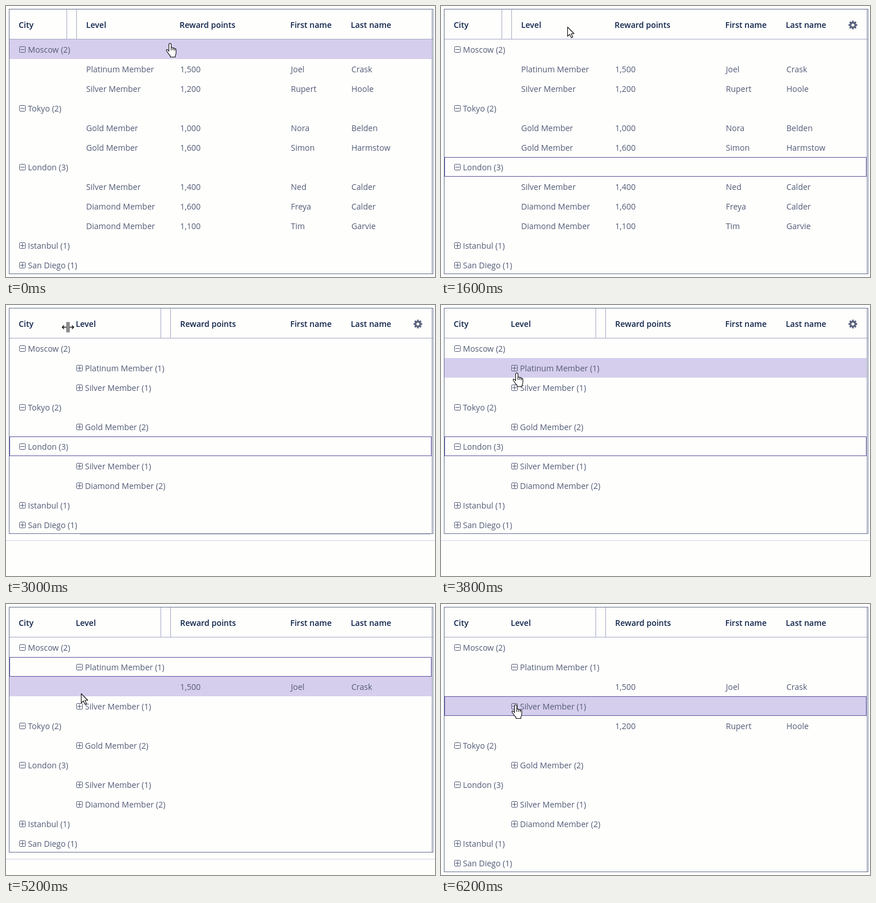
Write an HTML page with a canvas that moves like this. It is 744 px wide and 470 px high and loops after 7.2 s.

```html
<!DOCTYPE html>
<html lang="en">
<head>
<meta charset="utf-8">
<title>Grouped grid</title>
<style>
html, body { margin: 0; width: 100%; height: 100%; overflow: hidden; background: #fefefd; }
canvas { display: block; }
</style>
</head>
<body>
<canvas id="stage" width="744" height="470"></canvas>
<script>
const ctx = document.getElementById('stage').getContext('2d');
const LOOP = 7200, STEP = 200, HEAD = 58, ROW = 34;
const INK = '#535c76', DARK = '#10234a', RULE = '#a4abc3', EDGE = '#68718f';
const HOVER = '#d6ceed', FOCUS = '#5f55a0', PAPER = '#fefefd';
const FONT = '"Open Sans", "Noto Sans", sans-serif';

const people = [
  ['Platinum Member', '1,500', 'Joel', 'Crask'],
  ['Silver Member', '1,200', 'Rupert', 'Hoole'],
  ['Gold Member', '1,000', 'Nora', 'Belden'],
  ['Gold Member', '1,600', 'Simon', 'Harmstow'],
  ['Silver Member', '1,400', 'Ned', 'Calder'],
  ['Diamond Member', '1,600', 'Freya', 'Calder'],
  ['Diamond Member', '1,100', 'Tim', 'Garvie']
];
const cities = [
  ['Moscow', people.slice(0, 2)],
  ['Tokyo', people.slice(2, 4)],
  ['London', people.slice(4)]
];

const group = (x, label, count, open) => ({ x, open, label: `${label} (${count})` });

// Rows for the grid; openTiers tells how many tier groups are expanded.
function buildRows(byTier, openTiers) {
  const rows = [];
  for (const [city, members] of cities) {
    rows.push(group(23, city, members.length, true));
    if (!byTier) {
      members.forEach(m => rows.push({ cells: m }));
      continue;
    }
    for (const tier of new Set(members.map(m => m[0]))) {
      const inTier = members.filter(m => m[0] === tier);
      const open = openTiers-- > 0;
      rows.push(group(122, tier, inTier.length, open));
      if (open) inTier.forEach(m => rows.push({ cells: ['', ...m.slice(1)] }));
    }
  }
  rows.push(group(23, 'Istanbul', 1, false), group(23, 'San Diego', 1, false));
  return rows;
}

const flat = buildRows(false);
const states = [
  { from: 0, rows: flat, focus: -1 },
  { from: 600, rows: flat, focus: 6 },
  { from: 2400, rows: buildRows(true, 0), focus: 5, tiered: true },
  { from: 4400, rows: buildRows(true, 1), focus: 1, tiered: true },
  { from: 5600, rows: buildRows(true, 2), focus: 3, tiered: true }
];
const bottoms = [
  { from: 0, y: 464 }, { from: 2600, y: 396 },
  { from: 4600, y: 430 }, { from: 5800, y: 464 }
];
const path = [
  [0, 284, 65], [600, 180, 275], [800, 180, 275], [1600, 219, 36],
  [2400, 107, 38], [3200, 107, 38], [3800, 131, 118], [4000, 131, 116],
  [4800, 131, 116], [5400, 129, 175], [LOOP, 129, 175]
];

const current = (list, t) => list.filter(s => s.from <= t).pop();

function pointer(t) {
  const i = path.findIndex(p => p[0] > t);
  const [t0, x0, y0] = path[i - 1], [t1, x1, y1] = path[i];
  const k = (t - t0) / (t1 - t0);
  return { x: Math.round(x0 + (x1 - x0) * k), y: Math.round(y0 + (y1 - y0) * k) };
}

function rect(x, y, w, h, color) {
  ctx.fillStyle = color;
  ctx.fillRect(x, y, w, h);
}

function box(x, y, w, h, color) {
  ctx.strokeStyle = color;
  ctx.lineWidth = 1;
  ctx.strokeRect(x + .5, y + .5, w - 1, h - 1);
}

function text(str, x, y, color = INK, weight = 400) {
  ctx.font = `${weight} 14px ${FONT}`;
  ctx.fillStyle = color;
  ctx.fillText(str, x, y);
}

function toggle(x, y, open) {
  ctx.strokeStyle = INK;
  ctx.lineWidth = 1;
  ctx.beginPath();
  ctx.roundRect(x + .5, y + .5, 10, 10, 1.2);
  ctx.stroke();
  rect(x + 2, y + 5, 7, 1, INK);
  if (!open) rect(x + 5, y + 2, 1, 7, INK);
}

function gear(x, y) {
  ctx.save();
  ctx.translate(x, y);
  ctx.fillStyle = '#59617c';
  ctx.beginPath();
  for (let i = 0; i < 8; i++) {
    const a = i * Math.PI / 4;
    [[-.29, 5.6], [-.19, 7.7], [.19, 7.7], [.29, 5.6]].forEach(([d, r]) =>
      ctx.lineTo(r * Math.cos(a + d), r * Math.sin(a + d)));
  }
  ctx.closePath();
  ctx.moveTo(2.6, 0);
  ctx.arc(0, 0, 2.6, 0, Math.PI * 2);
  ctx.fill('evenodd');
  ctx.restore();
}

const handShape = new Path2D('M5.5 15V3Q5.5.8 7.5.8T9.5 3V8.5Q11.7 7.2 12.7 9.2Q14.9 8.2 15.7 10.2Q18 9.6 18 12V17Q17.8 20 16.5 22V24.5H8V22.5Q5 19.5 3 16Q.3 12.8 1.4 11.8Q3 11 5.5 14');
const handLines = new Path2D('M9.5 8V13M12.7 9V13M15.7 10V13.5');
const arrowShape = new Path2D('M.5.5V16.5L4.2 13L7 19L9.6 17.9L6.9 12H11.8Z');
const sideShape = new Path2D('M-1.5 -9V9M1.5 -9V9M-3 0H-10M-7 -3L-10 0L-7 3M3 0H10M7 -3L10 0L7 3');

function cursor(kind, x, y) {
  ctx.save();
  ctx.strokeStyle = '#111';
  ctx.fillStyle = '#fff';
  ctx.lineWidth = 1.1;
  ctx.lineJoin = 'round';
  if (kind === 'hand') {
    ctx.translate(x - 7, y - 1);
    ctx.fill(handShape);
    ctx.stroke(handShape);
    ctx.stroke(handLines);
  } else if (kind === 'arrow') {
    ctx.translate(x, y);
    ctx.fill(arrowShape);
    ctx.stroke(arrowShape);
  } else {
    ctx.translate(x + .5, y + .5);
    ctx.strokeStyle = '#fff';
    ctx.lineWidth = 3;
    ctx.stroke(sideShape);
    ctx.strokeStyle = '#111';
    ctx.lineWidth = 1.4;
    ctx.stroke(sideShape);
  }
  ctx.restore();
}

function header(tiered, withGear) {
  const labels = [
    ['City', 22], ['Level', tiered ? 121 : 139],
    ['Reward points', tiered ? 302 : 301], ['First name', 493], ['Last name', 598]
  ];
  labels.forEach(([label, x]) => text(label, x, 38, DARK, 600));
  (tiered ? [268, 285] : [105, 122]).forEach(x => rect(x, 6, 1, 51, RULE));
  rect(6, 57, 734, 1, RULE);
  if (withGear) gear(714.3, 33);
}

function body(rows, focus, hover) {
  const columns = [139, 302, 494, 599];
  rows.forEach((row, i) => {
    const y = HEAD + i * ROW;
    if (i === hover) rect(6, y, 732, ROW, HOVER);
    if (i === focus) box(6, y, 732, ROW, FOCUS);
    if (row.cells) {
      row.cells.forEach((cell, c) => text(cell, columns[c], y + 23));
    } else {
      toggle(row.x, y + 12, row.open);
      text(row.label, row.x + 15, y + 23);
    }
  });
}

function draw(t) {
  const { rows, focus, tiered } = current(states, t);
  const bottom = current(bottoms, t).y;
  const { x, y } = pointer(t);
  const hover = Math.floor((y - HEAD) / ROW);

  rect(0, 0, 744, 470, PAPER);
  ctx.save();
  ctx.beginPath();
  ctx.rect(5, 5, 736, bottom - 4);
  ctx.clip();
  header(tiered, t >= 600 && t < 4400);
  body(rows, focus, hover);
  rect(738, 6, 1, bottom - 6, RULE);
  ctx.restore();

  box(5, 5, 736, bottom - 4, EDGE);
  if (bottom < 464) rect(0, bottom + 12, 744, 1, '#d5d5e3');
  if (t >= 2600 && t < 3400) rect(128, bottom + 1, 608, 1, '#c3c8d8');

  const resizing = tiered && hover < 0 && Math.abs(x - 107) < 6;
  const onGroup = hover >= 0 && !rows[hover].cells;
  cursor(resizing ? 'resize' : onGroup ? 'hand' : 'arrow', x, y);
}

const start = performance.now();
function tick() {
  const t = (performance.now() - start) % LOOP;
  draw(Math.floor(t / STEP) * STEP);
  requestAnimationFrame(tick);
}
tick();
</script>
</body>
</html>
```
